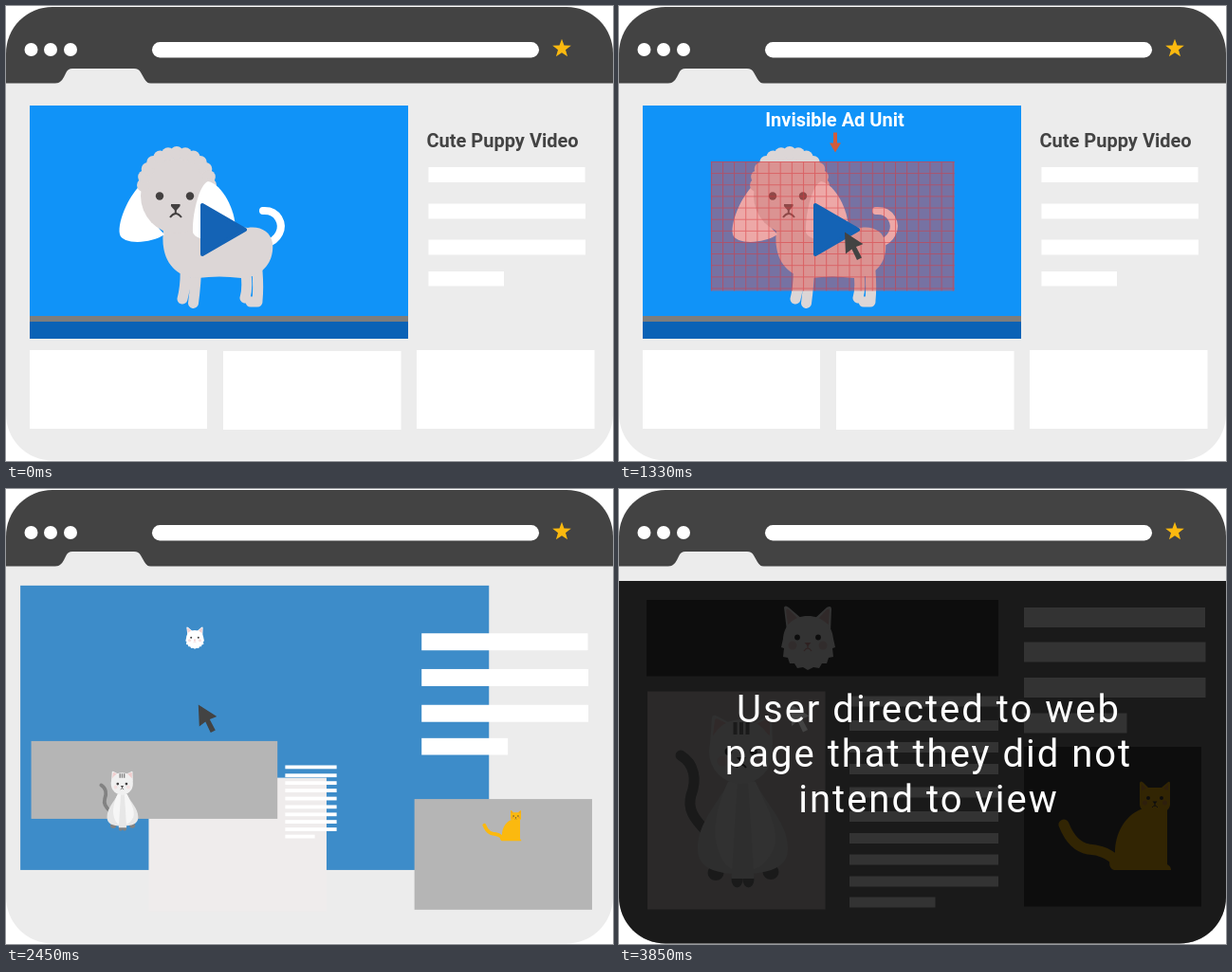
Animation of 640x480 px, one loop 8.61 s. Source, as an HTML page:

```html
<!DOCTYPE html>
<html lang="en">
<head>
<meta charset="utf-8">
<title>Invisible ad unit</title>
<style>
  html, body { margin: 0; width: 100%; height: 100%; overflow: hidden; background: #fff; }
  svg { display: block; width: 100vw; height: 100vh; }
  text { font-family: Roboto, Arial, sans-serif; }
  .bold { font-weight: 700; font-size: 20px; }
</style>
</head>
<body>
<svg viewBox="0 0 640 480">
  <defs>
    <clipPath id="window"><rect y="1" width="640" height="478.5" rx="49"/></clipPath>
    <pattern id="grid" width="12" height="12" patternUnits="userSpaceOnUse" x="-127" y="-67.5">
      <path d="M0 .5H12M.5 0V12" stroke="#d8363c" stroke-opacity=".55" fill="none"/>
    </pattern>
  </defs>

  <g clip-path="url(#window)">
    <rect width="640" height="480" fill="#ececec"/>
    <rect width="640" height="81.5" fill="#434343"/>
    <path d="M52 82Q58 81 61 75L63 71Q65 66 70 66H135Q140 66 142 70L146 77Q149 82 153 82Z" fill="#ececec"/>
    <g fill="#fff">
      <circle cx="26.5" cy="46" r="7"/><circle cx="47" cy="46" r="7"/><circle cx="68" cy="46" r="7"/>
      <rect x="154" y="38" width="408" height="16.5" rx="8.2"/>
    </g>
    <path id="star" fill="#fbb90f"/>

    <g id="boxes"></g>

    <g id="video">
      <rect x="25" y="327" width="399" height="6" fill="#7d7d7d"/>
      <rect x="25" y="333" width="399" height="18" fill="#0a62b6"/>
      <g id="puppy">
        <path d="M271 216C287 215 293 230 288 240Q284 248 274 251" fill="none" stroke="#fff" stroke-width="8" stroke-linecap="round"/>
        <g fill="none" stroke="#dcd6d6" stroke-width="11" stroke-linecap="round">
          <path d="M189 270Q190 295 186 309M201 270Q200 295 197.500 313.500M251 270Q256 295 252 308M263 262Q267 290 265 311M258 312H265"/>
        </g>
        <path d="M166 236C162 268 178 286 202 287Q225 284 248 287C272 286 283 268 281 250C279 238 268 232 255 234L205 228Z" fill="#dcd6d6"/>
        <path d="M144 187C132 196 117 226 120 241C123 252 153 251 167 241C155 228 146 216 144 187Z" fill="#fff"/>
        <g fill="#dcd6d6"><ellipse cx="180" cy="200" rx="38" ry="40"/><g id="curls"></g></g>
        <path d="M213 185C203 189 196 222 197 239C201 250 236 250 242 236C242 215 228 188 213 185Z" fill="#fff"/>
        <g fill="#434040"><circle cx="162" cy="200.500" r="4.200"/><circle cx="194" cy="200.500" r="4.200"/><path d="M174 209H183.500Q184.500 211 182 213L178.800 216.500L175.500 213Q173 211 174 209Z"/></g>
        <path d="M178.800 214V219M173 223Q178.800 215 185 223" fill="none" stroke="#434040" stroke-width="2"/>
      </g>
      <g id="ad">
        <rect x="-127" y="-67.500" width="254" height="135" fill="#dc5350" fill-opacity=".5"/>
        <rect x="-127" y="-67.500" width="254" height="135" fill="url(#grid)"/>
      </g>
      <path d="M207 210V262L252 236Z" fill="#1463b5" stroke="#1463b5" stroke-width="4" stroke-linejoin="round"/>
      <g id="label">
        <text class="bold" x="227.500" y="127" text-anchor="middle" fill="#fff">Invisible Ad Unit</text>
        <path id="pointer" d="M-2 0H2V11H6L0 21L-6 11H-2Z" fill="#cf5c3d"/>
      </g>
    </g>
    <text id="title" class="bold" x="443.500" y="149" fill="#434343">Cute Puppy Video</text>

    <g id="list" fill="#fff"></g>

    <g id="whiteCat">
      <path d="M177 150L174 125Q175 122 179 125L194 138L206 137L219 125Q224 122 224 127L223 150Z" fill="#fff"/>
      <path d="M178 143L176 128Q177 125 180 128L189 137ZM221 143L222 128Q221 125 218 128L210 137Z" fill="#f1cfcf"/>
      <path d="M199 134C184 134 174 144 173 158L171 167L174 168L173 177L178 178L180 184L185 184L188 189L194 188L199 191L205 188L211 189L214 184L219 184L221 178L226 177L225 168L228 167L226 158C225 144 214 134 199 134Z" fill="#fff"/>
      <g fill="#f7dede"><circle cx="183" cy="165" r="4.500"/><circle cx="215" cy="165" r="4.500"/></g>
      <g fill="#434040"><circle cx="188" cy="156.500" r="2.900"/><circle cx="210" cy="156.500" r="2.900"/></g>
      <path d="M195.500 162H202.500L199 166Z" fill="#e9a8a8"/>
      <path d="M199 165V168M195 171Q199 165 203 171" fill="none" stroke="#e9a8a8" stroke-width="1.200"/>
    </g>

    <g id="greyCat">
      <path d="M93 362C78 347 72 337 76 323C82 307 80 290 65 281" fill="none" stroke="#828282" stroke-width="11" stroke-linecap="round"/>
      <g fill="#828282"><ellipse cx="102" cy="405" rx="8.500" ry="8"/><ellipse cx="160" cy="404" rx="8.500" ry="8"/><ellipse cx="124.500" cy="412" rx="6" ry="8.500"/><ellipse cx="136.500" cy="412" rx="6" ry="8.500"/></g>
      <path d="M118 306C104 332 83 352 83 379C83 398 98 406 128 406C160 406 178 399 178 379C178 352 154 332 142 306Z" fill="#e7e7e7"/>
      <path d="M115 309C104 332 98 360 104 378Q109 397 121 402L128 309ZM134 309L140 402Q154 398 163 380C171 360 153 330 144 309Z" fill="#f6f6f6"/>
      <path d="M125 308L118.500 411H142.500L136 308Z" fill="#e7e7e7"/>
      <path d="M96 270L98 241Q99 237 104 240L121 249H138L156 240Q161 237 161 242L162 270Z" fill="#f0f0f0"/>
      <path d="M99 260L101 244Q102 241 105 243L117 249ZM159 260L159 244Q158 241 155 243L142 249Z" fill="#f0cdcd"/>
      <ellipse cx="128.500" cy="277" rx="33.500" ry="34" fill="#f0f0f0"/>
      <path d="M122.500 246V259M129 246V259M135.500 246V259" stroke="#828282" stroke-width="4"/>
      <g fill="#f4e0e0"><circle cx="109" cy="287" r="5.500"/><circle cx="148" cy="287" r="5.500"/></g>
      <g fill="#434040"><circle cx="115.500" cy="277" r="3.900"/><circle cx="142" cy="277" r="3.900"/><path d="M124 283H134L129 289Z"/></g>
      <path d="M129 288V291M124 294Q129 287 134 294" fill="none" stroke="#434040" stroke-width="1.800"/>
    </g>

    <g id="goldCat">
      <path d="M469 354Q478 377 495 380Q514 381 526 394" fill="none" stroke="#fbb90f" stroke-width="11" stroke-linecap="round"/>
      <path d="M550 338C533 345 523 364 523 383L517 393Q517 401 522 402H582Q582 398 578 396V338Z" fill="#fbb90f"/>
      <path d="M549 333V310Q550 307 553 310L558 315H572L578 310Q581 307 581 311V333Q580 342 565 342Q550 342 549 333Z" fill="#fbb90f"/>
      <g fill="#e79a3a"><path d="M551 318V311L556 316ZM579 318V311L574 316Z"/><circle cx="554.500" cy="331" r="2.500"/><circle cx="575.500" cy="331" r="2.500"/></g>
      <g fill="#434040"><circle cx="558" cy="326" r="2"/><circle cx="572" cy="326" r="2"/><path d="M562.500 329.500H567.500L565 332.500Z"/></g>
      <path d="M565 332V334M562 336Q565 332 568 336" fill="none" stroke="#434040" stroke-width="1"/>
    </g>

    <rect id="shade" y="97" width="640" height="383"/>
    <path id="cursor" d="M0 0L19.500 12.500L12 15.500L18 27L13 29.500L7.500 18L1 23Z" fill="#434343"/>
    <g id="message" fill="#fff" font-size="40" letter-spacing="2" text-anchor="middle">
      <text x="326.500" y="245.500">User directed to web</text>
      <text x="326.500" y="293">page that they did not</text>
      <text x="326.500" y="341">intend to view</text>
    </g>
  </g>
</svg>

<script>
const LOOP = 8610, STEP = 70;
const el = id => document.getElementById(id);
const set = (node, attrs) => { for (const k in attrs) node.setAttribute(k, attrs[k]); };
const add = (parent, tag, attrs = {}) => {
  const node = document.createElementNS(parent.namespaceURI, tag);
  set(node, attrs);
  return parent.appendChild(node);
};
const mix = (a, b, p) => a + (b - a) * p;
const mixAll = (a, b, p) => a.map((v, i) => mix(v, b[i], p));
const ramp = (t, from, to) => Math.min(1, Math.max(0, (t - from) / (to - from)));
const sine = u => (1 - Math.cos(Math.PI * u)) / 2;

// Boxes that morph between the two pages: [x, y, width, height], [r, g, b]
const WHITE = [255, 255, 255], DARK = [67, 67, 67];
const boxes = [
  [[25, 105, 399, 246], [0, 97, 640, 383], [16, 147, 248], [130, 130, 130]],
  [[229, 364, 187.5, 83], [30, 213.5, 187.5, 230], WHITE, [215, 208, 208]],
  [[25, 363, 187, 83], [29, 117, 371, 80.5], WHITE, DARK],
  [[433, 363, 187.5, 83], [427, 272, 187, 168.5], WHITE, DARK],
  [[445.5, 170, 165, 16], [427, 125, 191, 21], WHITE, WHITE],
  [[445.5, 208.5, 165.5, 16], [427, 161.5, 191.5, 21], WHITE, WHITE],
  [[445.5, 246.5, 165.5, 16], [427, 199, 191.5, 21], WHITE, WHITE],
  [[445.5, 280, 79.5, 15.5], [427, 236.5, 108.5, 21], WHITE, WHITE]
].map(([from, to, c0, c1]) => ({ node: add(el("boxes"), "rect"), from, to, c0, c1 }));

[218.5, 244, 267, 290, 314.5, 340, 363, 385.5, 408.5, 430.5].forEach((y, i) =>
  add(el("list"), "rect", { x: 243, y, width: i < 9 ? 157 : 90.5, height: 11 }));

for (let i = 0; i <= 12; i++) {
  const a = Math.PI * (1 + i / 12);
  add(el("curls"), "circle", { cx: 180 + 35 * Math.cos(a), cy: 189 + 34 * Math.sin(a), r: 7 });
}

const starPoints = Array.from({ length: 10 }, (_, i) => {
  const a = Math.PI * (i / 5 - 0.5), r = i % 2 ? 4.2 : 10.3;
  return `${586 + r * Math.cos(a)} ${45 + r * Math.sin(a)}`;
});
set(el("star"), { d: `M${starPoints.join("L")}Z` });

const zoom = (id, x, y, s) =>
  set(el(id), { transform: `translate(${x} ${y}) scale(${s}) translate(${-x} ${-y})`, display: s ? "inline" : "none" });

function draw(t) {
  const morph = sine(ramp(t, 2290, 2660));
  const grow = sine(ramp(t, 2310, 2660));
  const fade = 1 - ramp(t, 2030, 2380);

  for (const { node, from, to, c0, c1 } of boxes) {
    const [x, y, width, height] = mixAll(from, to, morph);
    set(node, { x, y, width, height, fill: `rgb(${mixAll(c0, c1, morph).map(Math.round)})` });
  }

  // Ad unit and its pointer pulse together
  const pulse = Math.sin((t - 902) / 1120 * 2 * Math.PI);
  const show = ramp(t, 210, 700);
  set(el("ad"), { transform: `translate(225.3 232.3) scale(${(249.5 + 11 * pulse) / 254})`, opacity: show });
  set(el("pointer"), { transform: `translate(228 ${135.3 - 2.8 * pulse})` });
  set(el("label"), { opacity: show });
  set(el("video"), { opacity: fade });
  set(el("title"), { opacity: fade });

  zoom("list", 321.5, 330, grow);
  zoom("whiteCat", 199, 157, grow);
  zoom("greyCat", 119, 329, grow);
  zoom("goldCat", 523, 355, grow);

  const go = sine(ramp(t, 210, 1520));
  const cx = mix(mix(628, 217, go), 181, morph);
  const cy = mix(417, 228, go) + 6 * Math.sin(Math.PI * go) - morph;
  set(el("cursor"), { transform: `translate(${cx} ${cy})`, display: t < 210 ? "none" : "inline" });

  const dim = ramp(t, 3579, 3850) * (t >= 3640);
  set(el("shade"), { opacity: 0.8 * dim });
  zoom("message", 321, 337, dim);
}

const start = performance.now();
function tick() {
  const t = Math.max(0, performance.now() - start) % LOOP;
  draw(Math.floor(t / STEP) * STEP);
  requestAnimationFrame(tick);
}
tick();
</script>
</body>
</html>
```
